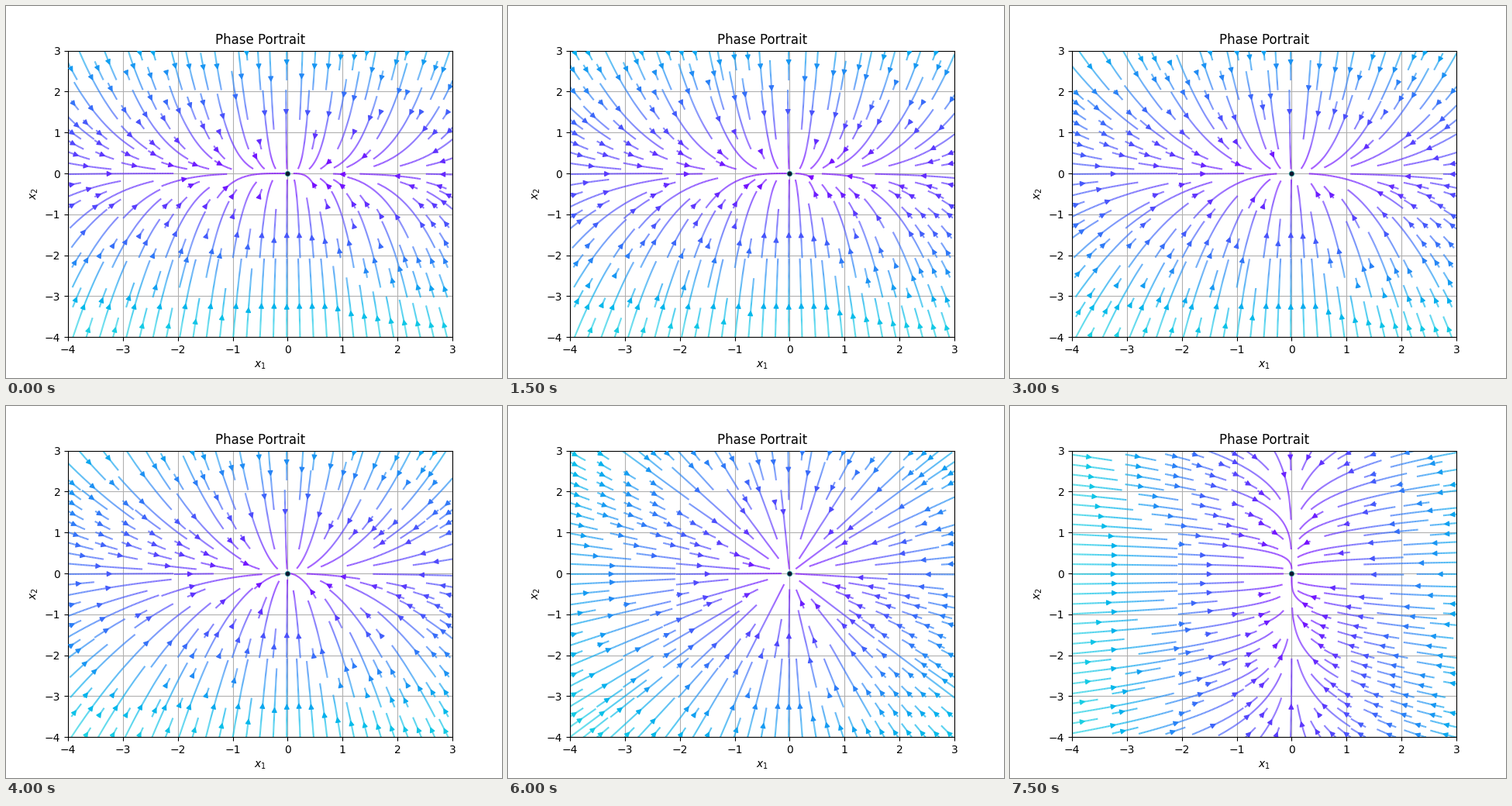
Animation of 640x480 px, one loop 8000 ms. Source, as a matplotlib script:

```python
import math

import matplotlib.pyplot as plt
import numpy as np
from matplotlib.animation import FuncAnimation
from matplotlib.collections import LineCollection, PolyCollection

LO, HI = -4.0, 3.0
CELLS = 29
CELL = (HI - LO) / CELLS
STEP = 0.02
REACH = {1: 1.805, -1: 1.825}   # longest run downstream and upstream
FRAMES = 16
TOP_SHADE = 0.32     # part of the colour map used by the fastest point
CMAP = plt.get_cmap("rainbow")


def cell_of(x, y):
    return int((y - LO) / CELL), int((x - LO) / CELL)


def half_line(x, y, k, sign, used, own):
    """Follow x' = -x, y' = -k y until length, border or a taken cell stops it."""
    pts = []
    for _ in range(int(REACH[sign] / STEP)):
        if math.hypot(x, y) < 0.03:
            break
        u, v = -x, -k * y
        h = sign * STEP / math.hypot(u, v)
        x, y = x + h * u, y + h * v
        if not (LO < x < HI and LO < y < HI):
            pts.append((min(max(x, LO), HI), min(max(y, LO), HI)))
            break
        cell = cell_of(x, y)
        if cell not in own:
            if used[cell]:
                break
            used[cell] = True
            own.add(cell)
        pts.append((x, y))
    return pts


def streamlines(k):
    used = np.zeros((CELLS, CELLS), bool)
    lines = []
    for j in range(CELLS):
        for i in range(CELLS):
            if used[j, i]:
                continue
            used[j, i] = True
            own = {(j, i)}
            x, y = LO + (i + 0.5) * CELL, LO + (j + 0.5) * CELL
            ahead = half_line(x, y, k, 1, used, own)
            back = half_line(x, y, k, -1, used, own)
            pts = back[::-1] + [(x, y)] + ahead
            if len(pts) > 1:
                lines.append(np.array(pts))
    return lines


def speed(p, k):
    return np.hypot(p[..., 0], k * p[..., 1])


def shade(p, k):
    return CMAP(TOP_SHADE * speed(p, k) / (4 * math.hypot(1, k)))


fig, ax = plt.subplots(figsize=(6.4, 4.8), dpi=100)
ax.set(xlim=(LO, HI), ylim=(LO, HI), title="Phase Portrait",
       xlabel="$x_1$", ylabel="$x_2$")
ax.set_xticks(range(-4, 4))
ax.set_yticks(range(-4, 4))
ax.grid(True)

PX = np.array([496.0, 369.6]) / (HI - LO)   # pixels per unit

flow = LineCollection([], linewidths=1.5, zorder=2)
heads = PolyCollection([], linewidths=1.0, zorder=3)
ax.add_collection(flow, autolim=False)
ax.add_collection(heads, autolim=False)
ax.plot(0, 0, "o", ms=5.2, color="#2a9d9d", mew=0, zorder=4)
ax.plot(0, 0, "o", ms=4, color="#10162e", mew=0, zorder=5)


def arrow(line, k, size):
    """Triangle where half of the speed summed along the line is reached."""
    run = np.cumsum(speed(line[:-1], k))
    n = min(int(np.searchsorted(run, run[-1] / 2)), len(line) - 2)
    tip = line[n:n + 2].mean(axis=0)
    d = (line[n + 1] - line[n]) * PX
    d /= np.hypot(*d) + 1e-9
    side = np.array([-d[1], d[0]])
    tri = [0 * d, -d * size + side * size / 2, -d * size - side * size / 2]
    return tip, tip + np.array(tri) / PX


def update(i):
    k = 4 - 0.25 * i
    segs, tips, tris, short = [], [], [], []
    for line in streamlines(k):
        segs.append(np.stack([line[:-1], line[1:]], axis=1))
        tiny = len(line) < 8
        tip, tri = arrow(line, k, 3.2 if tiny else 5.6)
        tips.append(tip)
        tris.append(tri)
        short.append(tiny)
    segs = np.concatenate(segs)
    ink = shade(segs.mean(axis=1), k)
    ink[:, 3] = 0.72
    flow.set_segments(segs)
    flow.set_color(ink)
    fill = shade(np.array(tips), k)
    fill[np.array(short)] = (0.25, 0.68, 0.78, 0.8)
    heads.set_verts(tris)
    heads.set_facecolor(fill)
    heads.set_edgecolor(fill)
    return flow, heads


anim = FuncAnimation(fig, update, frames=FRAMES, interval=500,
                     repeat=True, repeat_delay=0, blit=False)
plt.show()
```
